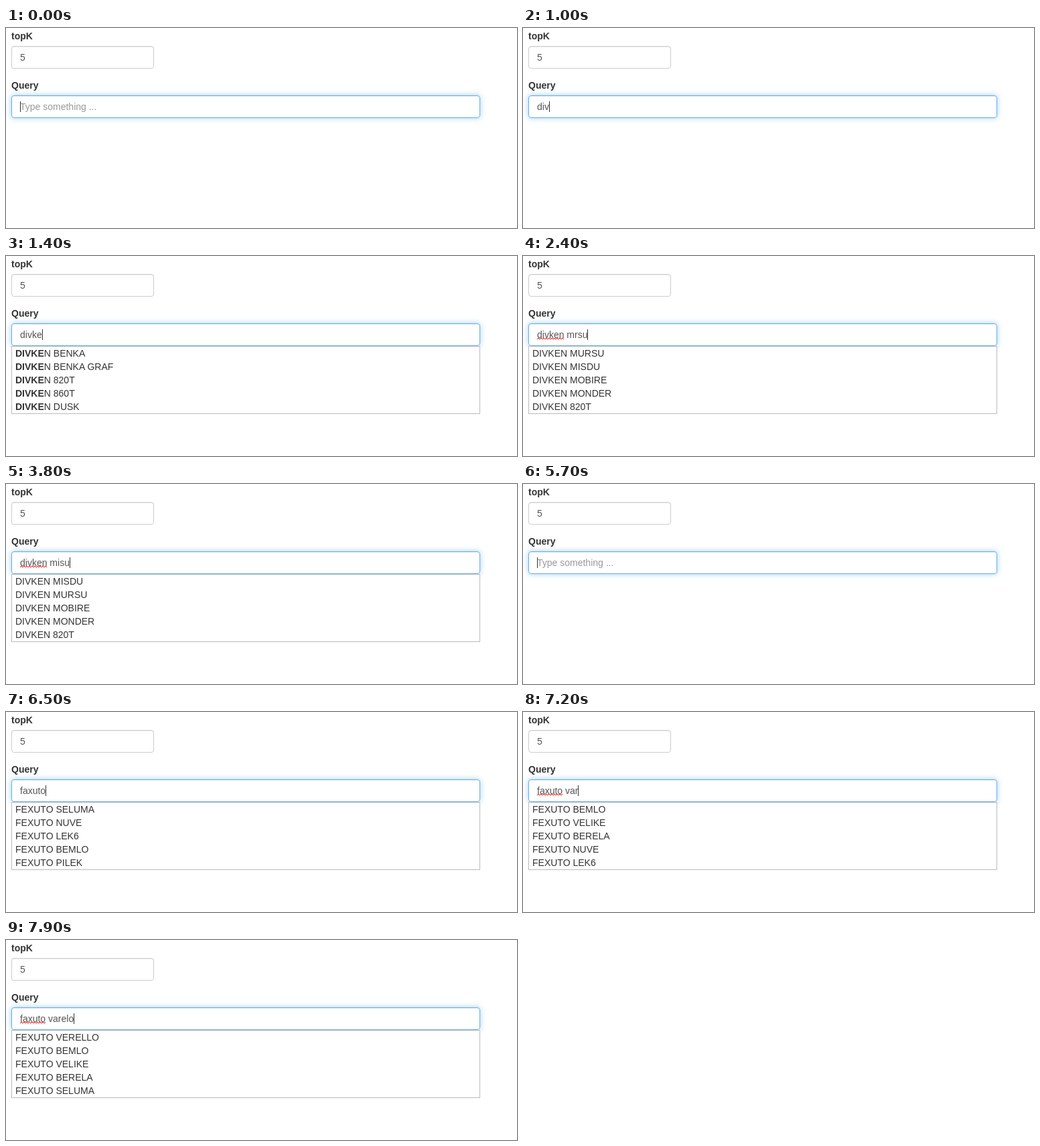
Animation, 763 px wide and 300 px high, one loop 8000 ms. Source, as an HTML page:

```html
<!DOCTYPE html>
<html lang="en">
<head>
<meta charset="utf-8">
<title>Query suggestions</title>
<style>
  html, body { margin: 0; width: 100%; height: 100%; overflow: hidden; background: #fff; }
  body { position: relative; font: 14px/20px "Liberation Sans", Arial, sans-serif; color: #333; }
  .label, .field, #list { position: absolute; left: 8px; box-sizing: border-box; white-space: pre; }
  .label { font-weight: bold; }
  .field {
    height: 34px; padding: 6px 12px; color: #555;
    border: 1px solid #ccc; border-radius: 4px;
    box-shadow: inset 0 1px 1px rgba(0, 0, 0, .075);
  }
  #query {
    top: 101px; width: 700px; border-color: #66afe9;
    box-shadow: inset 0 1px 1px rgba(0, 0, 0, .075), 0 0 8px rgba(102, 175, 233, .6);
  }
  #hint { position: absolute; left: 12px; top: 6px; color: #999; }
  #word { position: relative; display: inline-block; vertical-align: top; }
  #wave { position: absolute; left: 0; top: 14px; width: 100%; height: 4px; overflow: hidden; }
  #caret { position: absolute; width: 1px; height: 16px; margin-top: 2px; background: #333; }
  #list { top: 135px; width: 700px; padding: 0 5px; border: 1px solid #bbb; background: #fff; }
  #list div { height: 20px; }
</style>
</head>
<body>
<div class="label" style="top:2px">topK</div>
<div class="field" style="top:27px;width:213px">5</div>
<div class="label" style="top:76px">Query</div>
<div class="field" id="query"><span id="hint">Type something ...</span><span id="word"><span id="first"></span><svg id="wave"><path fill="none" stroke="#f00" stroke-width="1"/></svg></span><span id="rest"></span><span id="caret"></span></div>
<div id="list"></div>
<script>
const LOOP = 8000;
const $ = id => document.getElementById(id);

// [start time, text in the query field]
const typing = [
  [0, ""], [600, "d"], [700, "di"], [1000, "div"], [1200, "divk"], [1400, "divke"],
  [1600, "divken"], [1700, "divken "], [1900, "divken m"], [2100, "divken mr"],
  [2300, "divken mrs"], [2400, "divken mrsu"], [2800, "divken mrs"],
  [3000, "divken mr"], [3100, "divken m"],
  [3500, "divken mi"], [3600, "divken mis"], [3800, "divken misu"],
  [4100, "divken misur"], [4200, "divken misura"], [4900, "divken misur"],
  [5100, "divken misu"], [5200, "divken mis"], [5300, "divken mi"], [5400, "divken m"],
  [5700, ""], [5900, "fa"], [6000, "fax"], [6300, "faxu"], [6500, "faxuto"],
  [6600, "faxuto "], [6700, "faxuto v"], [7100, "faxuto va"], [7200, "faxuto var"],
  [7400, "faxuto vare"], [7700, "faxuto varel"], [7900, "faxuto varelo"]
];

const models = (brand, names) => names.split(",").map(n => brand + " " + n);
const range = models("DIVKEN", "BENKA,BENKA GRAF,820T,860T,DUSK");
const mFirst = models("DIVKEN", "MISDU,MURSU,MOBIRE,MONDER,820T");
const mSwapped = models("DIVKEN", "MURSU,MISDU,MOBIRE,MONDER,820T");
const mixed = models("DIVKEN", "MISDU,AKLORA,MOBIRE,SEPAVUL,MURSU");
const fexuto = names => models("FEXUTO", names);

// [start time, suggestions, matched query]
const results = [
  [0, [], ""], [1100, range, "div"], [1300, range, "divk"], [1400, range, "divke"],
  [1600, range, "divken"], [1800, range, "divken "], [2000, mFirst, "divken m"],
  [2100, mFirst, ""], [2400, mSwapped, ""], [2800, mFirst, ""],
  [3200, mFirst, "divken m"], [3500, mFirst, "divken mi"], [3700, mFirst, "divken mis"],
  [3800, mFirst, ""], [4200, mixed, ""], [5100, mFirst, ""],
  [5200, mFirst, "divken mis"], [5300, mFirst, "divken mi"], [5400, mFirst, "divken m"],
  [5700, [], ""], [6000, ["FAXEDO"], "fax"], [6300, [], ""],
  [6500, fexuto("SELUMA,NUVE,LEK6,BEMLO,PILEK"), ""],
  [6700, fexuto("BEMLO,VELIKE,NUVE,SELUMA,LEK6"), ""],
  [7200, fexuto("BEMLO,VELIKE,BERELA,NUVE,LEK6"), ""],
  [7500, fexuto("BEMLO,VELIKE,BERELA,SELUMA"), ""],
  [7700, fexuto("VERELLO,BEMLO,VELIKE,BERELA"), ""],
  [7900, fexuto("VERELLO,BEMLO,VELIKE,BERELA,SELUMA"), ""]
];

const at = (track, t) => track.filter(step => step[0] <= t).pop();

let zigzag = "M0 3";
for (let x = 2; x < 60; x += 2) zigzag += `L${x} ${x % 4 ? 1 : 3}`;
$("wave").firstChild.setAttribute("d", zigzag);

function showQuery(text) {
  const cut = text.indexOf(" ");
  const end = cut < 0 ? text.length : cut;
  $("first").textContent = text.slice(0, end);
  $("rest").textContent = text.slice(end);
  $("wave").style.display = cut < 0 ? "none" : "block";
  $("hint").style.display = text ? "none" : "inline";
}

function showList(rows, query) {
  const match = query.toUpperCase();
  $("list").style.display = rows.length ? "block" : "none";
  $("list").innerHTML = rows.map(row => {
    const n = row.startsWith(match) ? match.length : 0;
    return `<div><b>${row.slice(0, n)}</b>${row.slice(n)}</div>`;
  }).join("");
}

let lastText, lastResult;
function render(t) {
  const text = at(typing, t)[1];
  const result = at(results, t);
  if (text !== lastText) showQuery(lastText = text);
  if (result !== lastResult) {
    lastResult = result;
    showList(result[1], result[2]);
  }
  $("caret").style.visibility = t >= 4800 && t < 4900 ? "hidden" : "visible";
}

const start = performance.now();
function tick() {
  render((performance.now() - start) % LOOP);
  requestAnimationFrame(tick);
}
render(0);
requestAnimationFrame(tick);
</script>
</body>
</html>
```
